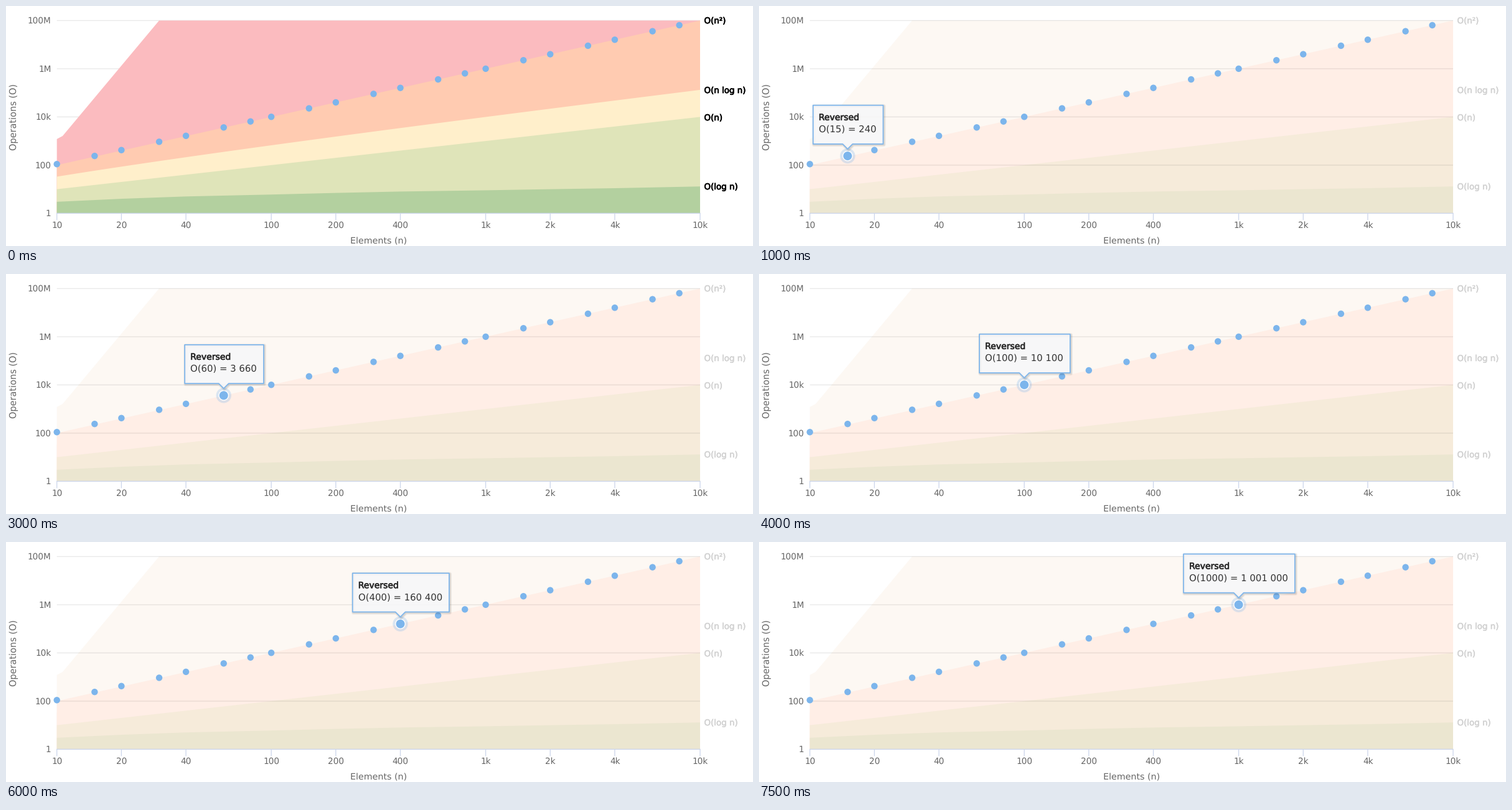
A matplotlib script that plays this animation: 1200 by 386 pixels, repeating every 8 s.

```python
import numpy as np
import matplotlib.pyplot as plt
from matplotlib.animation import FuncAnimation
from matplotlib.patches import Circle, Polygon
from matplotlib.patheffects import withStroke

W, H, DPI = 1200, 386, 100
PX = 72 / DPI
LEFT, RIGHT, BOTTOM = 81.7, 1115, 333.4
BLUE, GREY = "#7cb5ec", "#666666"

plt.rcParams["font.family"] = "DejaVu Sans"
plt.rcParams["text.hinting"] = "none"

fig = plt.figure(figsize=(W / DPI, H / DPI), dpi=DPI, facecolor="white")
ax = fig.add_axes([0, 0, 1, 1])
ax.set_xlim(0, W)
ax.set_ylim(H, 0)
ax.axis("off")


def sx(n):
    return LEFT + (RIGHT - LEFT) * (np.log10(n) - 1) / 3


def sy(ops):
    return BOTTOM - 38.75 * np.log10(ops)


def label(x, y, s, size, color=GREY, **kw):
    return ax.text(x, y, s, fontsize=size * PX, color=color, **kw)


def bold(text, color, width=0.7):
    text.set_color(color)
    text.set_path_effects([withStroke(linewidth=width * PX, foreground=color)])


def line(xs, ys, **kw):
    return ax.plot(xs, ys, lw=1.3 * PX, solid_capstyle="butt", snap=False, **kw)


def area(xs, ys):
    pts = [(LEFT, BOTTOM), *zip(xs, ys), (RIGHT, BOTTOM)]
    return ax.add_patch(Polygon(pts, lw=0, zorder=2))


# Complexity regions, from worst to best
ticks = np.array([10, 20, 40, 100, 200, 400, 1000, 2000, 4000, 10000])
n = np.geomspace(10, 10000, 80)
top = sy(1e8)
regions = [
    area([LEFT, 91, 246, RIGHT], [214, 209, top, top]),
    area(sx(n), sy(n ** 2)),
    area(sx(n), sy(n * np.log2(n))),
    area(sx(n), sy(n)),
    area(sx(ticks), sy(np.floor(np.log2(ticks)))),
]
VIVID = ["#fbbbbf", "#ffcbb1", "#ffefcb", "#dfe4b9", "#b3d09f"]
FADED = ["#fdf8f3", "#ffeee6", "#ffeee6", "#f6ebda", "#ebe6d0"]

# Grid and axes
grid = []
for ops, name in [(1, "1"), (100, "100"), (1e4, "10k"), (1e6, "1M"), (1e8, "100M")]:
    y = sy(ops)
    if ops > 1:
        grid += line([LEFT, RIGHT], [y, y], color="black", alpha=0.09)
    label(72.5, y + 4.8, name, 13.6, ha="right")

line([LEFT - 0.6, RIGHT + 0.6], [BOTTOM] * 2, color="#ccd6eb", zorder=4)
for t in ticks:
    line([sx(t)] * 2, [BOTTOM, BOTTOM + 11], color="#ccd6eb", zorder=4)
    label(sx(t) + 0.3, 357.2, f"{t // 1000}k" if t >= 1000 else str(t), 13.6,
          ha="center")

label(598.5, 382.3, "Elements (n)", 14.2, ha="center")
label(12.5, 178.5, "Operations (O)", 14.5, ha="center", va="center", rotation=90)

names = [label(1121.5, y + 5, s, 13.4) for y, s in
         [(23, "O(n²)"), (135, "O(n log n)"), (179, "O(n)"), (290, "O(log n)")]]

# Measured series
sizes = [m * d for d in (10, 100, 1000) for m in (1, 1.5, 2, 3, 4, 6, 8)]
for s in sizes:
    ax.add_patch(Circle((sx(s), sy(s * s + s)), 5.2, fc=BLUE, lw=0, zorder=6))

# Hovered point
halo = Circle((0, 0), 12.2, fc=BLUE, alpha=0.27, lw=0, zorder=5)
ring = Circle((0, 0), 8.4, fc="white", lw=0, zorder=7)
core = Circle((0, 0), 7, fc=BLUE, lw=0, zorder=8)
hover = [ax.add_patch(c) for c in (halo, ring, core)]

# Tooltip
shadows = [ax.add_patch(Polygon([(0, 0)], fill=False, ec="black", alpha=0.05,
                                lw=w * PX, joinstyle="round", zorder=9))
           for w in (6, 4, 2)]
box = ax.add_patch(Polygon([(0, 0)], fc=(0.97, 0.97, 0.975, 0.86), ec=BLUE,
                           lw=1.7 * PX, joinstyle="round", snap=False, zorder=10))
title = label(0, 0, "Reversed", 14, zorder=11)
value = label(0, 0, "", 14.95, color="#333333", zorder=11)
bold(title, "#2b2b2b")
tip = [*shadows, box, title, value]


def place_tip(s):
    x, y = sx(s), sy(s * s + s)
    value.set_text(f"O({s:.0f}) = " + f"{s * s + s:,.0f}".replace(",", " "))
    width = value.get_window_extent().transformed(ax.transData.inverted()).width
    half, mid = abs(width) / 2 + 10, x + 0.8
    l, r, b = mid - half, mid + half, y - 19.2
    t = b - 62.3
    outline = np.array([(l, t), (r, t), (r, b), (x + 8, b), (x, b + 8),
                        (x - 8, b), (l, b)])
    box.set_xy(outline)
    for sh in shadows:
        sh.set_xy(outline + 1.2)
    title.set_position((l + 9, t + 24))
    value.set_position((l + 9, t + 43.5))
    for c in hover:
        c.center = (x, y)


def update(i):
    active = i > 0
    for patch, color in zip(regions, FADED if active else VIVID):
        patch.set_facecolor(color)
    for g in grid:
        g.set_zorder(3 if active else 1)
    for text in names:
        bold(text, "#d2d2d2" if active else "black", 0.5 if active else 0.8)
    for a in hover + tip:
        a.set_visible(active)
    if active:
        place_tip(sizes[i - 1])
    return []


anim = FuncAnimation(fig, update, frames=16, interval=500, repeat=True,
                     repeat_delay=0, blit=False)
plt.show()
```
